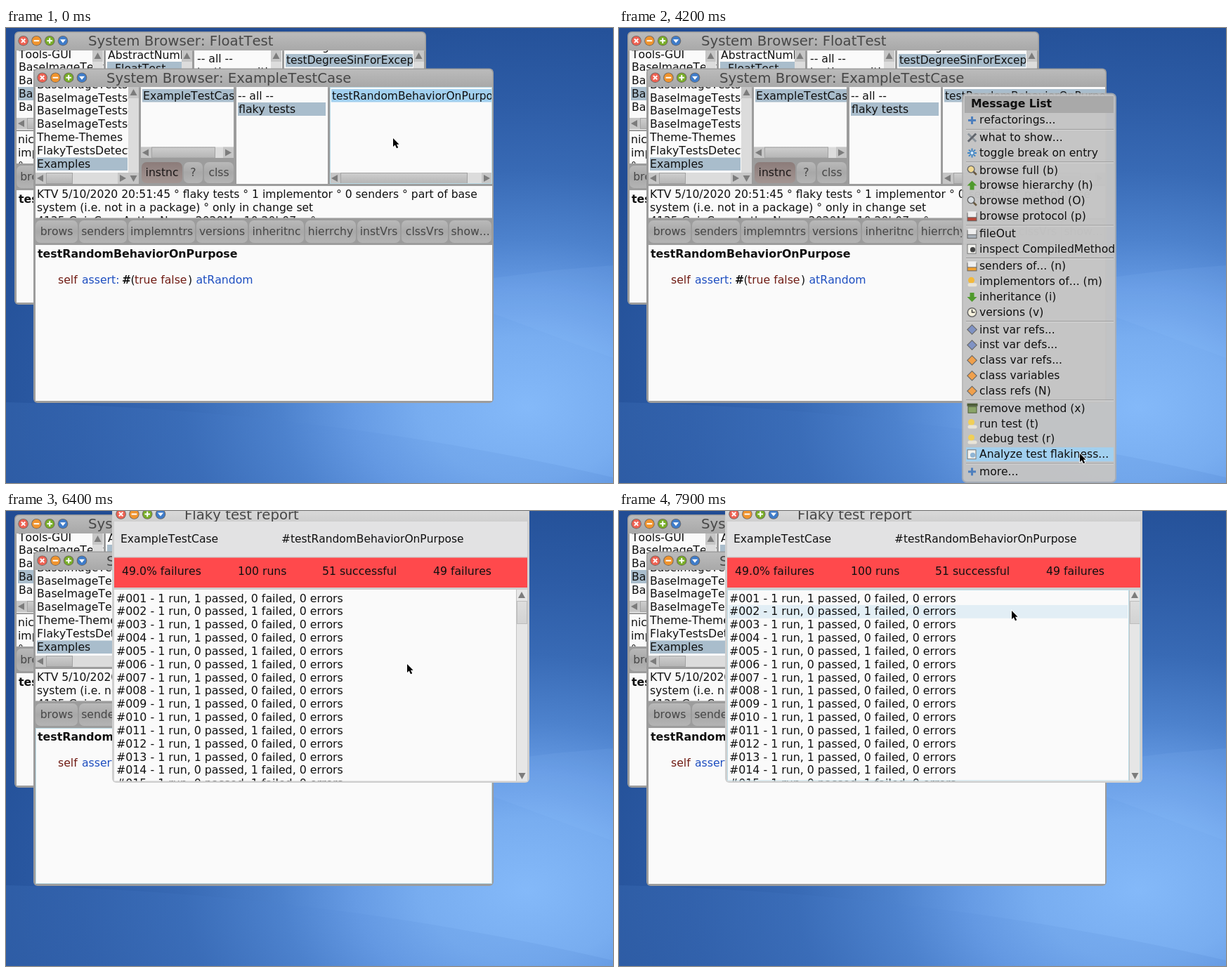
Animation of 864x648 px, one loop 8000 ms. Source, as an HTML page with a canvas:

```html
<!DOCTYPE html>
<html lang="en">
<head>
<meta charset="utf-8">
<title>Flaky test report</title>
<style>
html, body { margin: 0; width: 100%; height: 100%; overflow: hidden; background: #2a5ba8; }
canvas { display: block; }
</style>
</head>
<body>
<canvas id="stage" width="864" height="648"></canvas>
<script>
const c = document.getElementById('stage').getContext('2d');
const SEL = '#a9bdcc', HOVER = '#a2d0ef', FOCUS = '#bcdde8', ROW = 18.83, NAME = { size: 15.45 };

// Pointer path: time, x, y, hovered part (m method list, p code pane, 0.. report row)
const path = [
  [0, 551, 157, 'm'], [100, 505, 260, ''], [200, 459, 363, 'p'], [300, 459, 363, 'p'],
  [400, 457, 362, 'p'], [600, 457, 362, 'p'], [800, 477, 298, ''], [1100, 507, 203, 'm'],
  [1400, 538, 107, 'm'], [1900, 538, 107, 'm'], [2400, 489, 100, 'm'], [2500, 491, 99, 'm'],
  [4100, 491, 99, 'm'], [4200, 656, 606, ''], [4500, 656, 606, ''], [4700, 636, 610, ''],
  [4800, 636, 610, ''], [5000, 646, 607, ''], [5900, 646, 607, ''], [6000, 602, 345, -1],
  [6100, 588, 430, 'p'], [6300, 588, 430, 'p'], [6400, 571, 218, 'p'], [6500, 510, 195, 4],
  [6600, 455, 176, 3], [6700, 455, 176, 3], [6800, 422, 124, 1], [6900, 422, 124, 1],
  [7000, 428, 108, ''], [7200, 450, 78, ''], [7500, 520, 74, ''], [7700, 552, 116, 0],
  [7800, 557, 130, 0], [7900, 559, 142, 1], [8000, 559, 142, 1]
];

function pointer(t) {
  const i = path.findIndex(p => p[0] > t) - 1;
  const a = path[i], b = path[i + 1], k = (t - a[0]) / (b[0] - a[0]);
  return { x: a[1] + (b[1] - a[1]) * k, y: a[2] + (b[2] - a[2]) * k, over: a[3] };
}

function rect(x, y, x2, y2, fill) {
  c.fillStyle = fill;
  c.fillRect(x, y, x2 - x, y2 - y);
}

function frame(x, y, x2, y2, color) {
  c.strokeStyle = color;
  c.lineWidth = 1;
  c.strokeRect(x + .5, y + .5, x2 - x - 1, y2 - y - 1);
}

function round(x, y, x2, y2, r, fill) {
  c.beginPath();
  c.roundRect(x, y, x2 - x, y2 - y, r);
  c.fillStyle = fill;
  c.fill();
}

function poly(points, fill) {
  c.beginPath();
  points.forEach(([x, y]) => c.lineTo(x, y));
  c.closePath();
  c.fillStyle = fill;
  c.fill();
}

function disc(x, y, r, fill) {
  c.beginPath();
  c.arc(x, y, r, 0, 7);
  c.fillStyle = fill;
  c.fill();
}

function shade(y, y2, ...colors) {
  const g = c.createLinearGradient(0, y, 0, y2);
  colors.forEach((col, i) => g.addColorStop(i / (colors.length - 1), col));
  return g;
}

// y is the middle of the line
function text(s, x, y, { size = 15.7, color = '#101010', bold = false, align = 'left' } = {}) {
  c.font = `${bold ? 'bold ' : ''}${size}px "DejaVu Sans", sans-serif`;
  c.textAlign = align;
  c.fillStyle = color;
  c.fillText(s, x, Math.round(y + size * .32));
}

function clip(x, y, x2, y2, draw) {
  c.save();
  c.beginPath();
  c.rect(x, y, x2 - x, y2 - y);
  c.clip();
  draw();
  c.restore();
}

function pane(x, y, x2, y2, draw) {
  rect(x, y, x2, y2, '#fafafa');
  clip(x, y, x2, y2, draw);
}

function arrow(x, y, dir) {
  c.save();
  c.translate(x, y);
  c.rotate(dir * Math.PI / 2);
  poly([[-4, -5], [5, 0], [-4, 5]], '#7c7c7c');
  c.restore();
}

function hbar(x, x2, y, from, to) {
  rect(x, y, x2, y + 16, '#dcdcdc');
  rect(x, y, x + 15, y + 16, '#c6c6c6');
  rect(x2 - 15, y, x2, y + 16, '#c6c6c6');
  rect(from, y, to, y + 16, shade(y, y + 16, '#cfcfcf', '#b4b4b4'));
  frame(from, y, to, y + 16, '#a2a2a2');
  arrow(x + 7, y + 8, 2);
  arrow(x2 - 8, y + 8, 0);
}

function vbar(x, y, y2, down) {
  rect(x, y, x + 15, y2, '#dcdcdc');
  rect(x, y, x + 15, y + 16, '#c6c6c6');
  arrow(x + 7.5, y + 8, 3);
  if (down) {
    rect(x, y2 - 16, x + 15, y2, '#c6c6c6');
    arrow(x + 7.5, y2 - 8, 1);
  }
}

function windowFrame(x, y, x2, y2, title, tx, light) {
  round(x, y, x2, y2, 6, light ? '#cfcfcf' : '#9c9c9c');
  round(x + 1.5, y + 1.5, x2 - 1.5, y + 28, [5, 5, 0, 0],
    light ? shade(y, y + 26, '#dedede', '#cdcdcd') : shade(y, y + 26, '#bcbcbc', '#a9a9a9'));
  ['#ee6253', '#f0942e', '#78ad28', '#3f7cc9'].forEach((col, i) => {
    const cx = x + 12.6 + i * 18.8, cy = y + 13.2;
    disc(cx, cy, 7.3, '#6d6660');
    disc(cx, cy, 6.4, col);
    c.save();
    c.translate(cx, cy);
    if (i == 0) c.rotate(Math.PI / 4);
    if (i < 3) rect(-3.8, -1, 3.8, 1, '#fff');
    if (i == 0 || i == 2) rect(-1, -3.8, 1, 3.8, '#fff');
    if (i == 3) poly([[-4, -2], [4, -2], [0, 3]], '#fff');
    c.restore();
  });
  text(title, tx, y + 14, { size: 19.7, color: '#474747' });
}

function button(x, x2, y, y2, label, on) {
  round(x, y, x2, y2, 7, on ? shade(y, y2, '#8c7c7a', '#a39592') : shade(y, y2, '#b9b9b9', '#a8a8a8', '#b4b4b4'));
  text(label, (x + x2) / 2, (y + y2) / 2, { size: 15.6, color: on ? '#1c1818' : '#464646', align: 'center' });
}

function desktop() {
  // A wide glow low on the right
  const glow = c.createRadialGradient(0, 0, 0, 0, 0, 600);
  [[0, '#84b9f9'], [.17, '#78adf0'], [.28, '#669be4'], [.4, '#4d82cd'], [.56, '#386ab5'],
   [.73, '#2d5ca6'], [.9, '#25529a'], [1, '#214c94']].forEach(s => glow.addColorStop(...s));
  c.save();
  c.translate(740, 540);
  c.scale(1.45, 1);
  rect(-600, -600, 600, 600, glow);
  c.restore();
  poly([[600, 372], [694, 356], [780, 345], [864, 338], [864, 470]], 'rgba(150,200,255,.09)');

  const wave = c.createLinearGradient(0, 0, 864, 0);
  wave.addColorStop(0, 'rgba(120,180,255,.09)');
  wave.addColorStop(.45, 'rgba(70,125,210,.06)');
  wave.addColorStop(1, 'rgba(20,70,160,.08)');
  c.beginPath();
  c.moveTo(0, 533);
  c.bezierCurveTo(280, 540, 560, 570, 864, 640);
  c.lineTo(864, 648);
  c.lineTo(0, 648);
  c.fillStyle = wave;
  c.fill();
}

function backBrowser() {
  windowFrame(12, 5, 598, 394, 'System Browser: FloatTest', 117, false);
  pane(15, 32, 139, 145, () => {
    rect(17, 84, 123, 103, SEL);
    ['Tools-GUI', 'BaseImageTests', 'BaseImageTests', 'BaseImageTests', 'BaseImageTests']
      .forEach((s, i) => text(s, 18, 37.5 + i * ROW));
    vbar(123, 32, 128);
    hbar(15, 139, 128, 30, 70);
  });
  pane(142, 32, 265, 100, () => {
    rect(144, 48, 250, 67, SEL);
    text('AbstractNumberTest', 145, 39);
    text('FloatTest', 155, 57.5);
    vbar(250, 32, 100);
  });
  pane(268, 32, 393, 100, () => {
    text('-- all --', 272, 44);
    text('testing - arithmetic', 272, 63);
    vbar(377, 32, 100);
  });
  pane(396, 32, 595, 100, () => {
    rect(398, 37, 579, 55.5, SEL);
    text('testDegreeSin', 399, 27, NAME);
    clip(396, 32, 579, 100, () => text('testDegreeSinForExceptional', 399, 46, NAME));
    vbar(580, 32, 100);
  });
  pane(15, 147, 595, 193, () =>
    ['nice', 'implementor', '° only'].forEach((s, i) => text(s, 17, 159.3 + i * ROW)));
  button(15, 72, 196, 228, 'brows');
  pane(15, 231, 595, 391, () => text('testDegreeSin', 18, 243.5, { size: 15.8, bold: true }));
}

function frontBrowser(over) {
  windowFrame(39, 57.5, 694, 534, 'System Browser: ExampleTestCase', 143, false);
  pane(42, 84, 189, 222, () => {
    rect(44, 184.5, 173, 203, SEL);
    [...Array(4).fill('BaseImageTests-'), 'Theme-Themes', 'FlakyTestsDetection', 'Examples']
      .forEach((s, i) => text(s, 44, 80.8 + i * ROW));
    vbar(174, 84, 222, true);
    hbar(42, 174, 206, 57, 95);
  });
  pane(192, 84, 324, 185, () => {
    rect(194, 87, 324, 105.5, SEL);
    text('ExampleTestCase', 195, 97);
    hbar(192, 324, 169.5, 207, 298);
  });
  button(193, 251, 191, 221, 'instnc', true);
  button(253, 280, 191, 221, '?');
  button(282, 324, 191, 221, 'clss');
  pane(328, 84, 458, 222, () => {
    rect(330, 106, 455, 125, SEL);
    text('-- all --', 330, 97);
    text('flaky tests', 331, 115.7);
  });
  pane(461, 84, 692, 222, () => {
    rect(463, 87, 692, 105.5, over === 'm' ? HOVER : SEL);
    text('testRandomBehaviorOnPurpose', 464, 97, NAME);
    hbar(461, 692, 206, 476, 657);
    if (over === 'm') frame(461, 84, 692, 222, FOCUS);
  });
  pane(42, 225, 692, 270.5, () =>
    ['KTV 5/10/2020 20:51:45 ° flaky tests ° 1 implementor ° 0 senders ° part of base',
     'system (i.e. not in a package) ° only in change set',
     '4135-GainCore.AuthorName.2020Mar10.20h07m °']
      .forEach((s, i) => text(s, 44, 237.3 + i * ROW, { size: 15.58 })));
  const edges = [41, 103, 173, 270, 345, 425, 499, 562, 630, 692];
  ['brows', 'senders', 'implemntrs', 'versions', 'inheritnc', 'hierrchy', 'instVrs', 'clssVrs', 'show...']
    .forEach((s, i) => button(edges[i] + 1, edges[i + 1] - 1, 274, 306, s));
  pane(42, 309, 692, 531, () => {
    text('testRandomBehaviorOnPurpose', 45, 321.7, { size: 15.8, bold: true });
    const red = '#701c14', blue = '#1d4ec0';
    text('self', 74, 359.3, { color: red });
    text('assert:', 108, 359.3, { color: blue });
    text('#', 165, 359.3, { bold: true });
    text('(', 177.5, 359.3);
    text('true false', 183, 359.3, { color: red });
    text(')', 259, 359.3);
    text('atRandom', 270.5, 359.3, { color: blue });
    if (over === 'p') frame(42, 309, 692, 531, FOCUS);
  });
}

const icons = {
  plus(col) { rect(-5.5, -1.5, 5.5, 1.5, col); rect(-1.5, -5.5, 1.5, 5.5, col); },
  cross(col) { c.rotate(Math.PI / 4); rect(-8, -1.5, 8, 1.5, col); rect(-1.5, -8, 1.5, 8, '#60656c'); },
  star(col) {
    for (let i = 0; i < 4; i++) { rect(-6.5, -1, 6.5, 1, col); c.rotate(Math.PI / 4); }
    disc(0, 0, 2, '#e4f0fa');
  },
  diamond(col) { poly([[0, -7.5], [7.5, 0], [0, 7.5], [-7.5, 0]], '#666'); poly([[0, -6], [6, 0], [0, 6], [-6, 0]], col); },
  up(col) { poly([[0, -7], [7, 0], [3, 0], [3, 6], [-3, 6], [-3, 0], [-7, 0]], col); },
  down(col) { c.rotate(Math.PI); icons.up(col); },
  lens(col) { c.rotate(Math.PI / 4); rect(2, -1.3, 9, 1.3, '#6a5a40'); disc(-2, 0, 5.5, '#666'); disc(-2, 0, 4, col); },
  page(col) { rect(-7, -7, 6, 7, '#777'); rect(-6, -6, 5, 6, '#f2f2ee'); disc(1, 1, 3.6, col); },
  box(col) { rect(-7, -5, 7, 7, '#666'); rect(-6, -7, 6, 1, '#eee'); rect(-6, 2, 6, 6, col); },
  bin(col) { rect(-7, -7, 8, -3, '#4c5c38'); rect(-6, -3, 7, 7, '#4c5c38'); rect(-5, -2, 6, 6, col); },
  clock(col) { disc(0, 0, 7, '#666'); disc(0, 0, 5.5, col); rect(-.7, -4, .7, 0, '#333'); rect(-.7, -.7, 4, .7, '#333'); },
  face(col) { disc(-1, -2, 4.5, col); round(-6, 2, 7, 7, 3, '#e8e4d8'); }
};

// Groups are parted by separator lines
const menuGroups = [
  [['refactorings...', 'plus', '#4e7fbd']],
  [['what to show...', 'cross', '#8c949c'], ['toggle break on entry', 'star', '#3f86c6']],
  [['browse full (b)', 'lens', '#f0d890'], ['browse hierarchy (h)', 'up', '#4f9a2c'],
   ['browse method (O)', 'lens', '#d8dde2'], ['browse protocol (p)', 'box', '#b84838']],
  [['fileOut', 'box', '#a8b0b8'], ['inspect CompiledMethod', 'page', '#444']],
  [['senders of... (n)', 'box', '#f0a030'], ['implementors of... (m)', 'face', '#f2b93c'],
   ['inheritance (i)', 'down', '#4f9a2c'], ['versions (v)', 'clock', '#f4f0dc']],
  [['inst var refs...', 'diamond', '#7f92c4'], ['inst var defs...', 'diamond', '#7f92c4'],
   ['class var refs...', 'diamond', '#f0a04c'], ['class variables', 'diamond', '#f0a04c'],
   ['class refs (N)', 'diamond', '#f0a04c']],
  [['remove method (x)', 'bin', '#8aa468'], ['run test (t)', 'face', '#f0cf58'],
   ['debug test (r)', 'face', '#f0cf58'], ['Analyze test flakiness...', 'page', '#8fb4d4']],
  [['more...', 'plus', '#4e7fbd']]
];

function menu() {
  round(488, 92.5, 708, 648, 7, 'rgba(176,176,176,.85)');
  round(490, 94.5, 706, 646, 5, 'rgba(200,200,200,.8)');
  rect(492, 97, 704, 121, '#a9a9a9');
  text('Message List', 501, 108.3, { bold: true });
  let y = 131.5;
  menuGroups.forEach((group, g) => {
    if (g) {
      rect(494, y - 9.5, 704, y - 8.5, '#929292');
      rect(494, y - 8.5, 704, y - 7.5, '#dadada');
      y += 2.75;
    }
    for (const [label, icon, color] of group) {
      if (label.startsWith('Analyze')) rect(494, y - 10, 704, y + 10, HOVER);
      c.save();
      c.translate(502.5, y);
      icons[icon](color);
      c.restore();
      text(label, 513, y, { size: 15.55 });
      y += 21.87;
    }
  });
}

function report(over) {
  windowFrame(151, -8.7, 745, 387, 'Flaky test report', 254, true);
  rect(154, 15, 742, 65, '#e2e2e3');
  text('ExampleTestCase', 163, 40.3, { size: 15.6 });
  text('#testRandomBehaviorOnPurpose', 392, 40.3, NAME);
  rect(154, 66.5, 742, 109, '#ff494c');
  ['49.0% failures', '100 runs', '51 successful', '49 failures']
    .forEach((s, i) => text(s, [165, 330, 450, 608][i], 86));
  const focused = typeof over === 'number';
  pane(154, 112, 742, 384.5, () => {
    [...'101100111101100'].forEach((p, i) => {
      const y = 124.5 + i * ROW;
      if (over === i) rect(156, y - 9.4, 724, y + 9.4, '#e2eef5');
      text(`#${String(i + 1).padStart(3, '0')} - 1 run, ${p} passed, ${1 - p} failed, 0 errors`, 157, y, { size: 15.8 });
    });
    rect(726, 112, 742, 385, '#e6e6e6');
    rect(726, 112, 727, 385, '#c4c4c4');
    rect(727, 128, 742, 161, shade(128, 161, '#dedede', '#d2d2d2'));
    frame(727, 128, 742, 161, '#bdbdbd');
    arrow(734, 120, 3);
    arrow(734.5, 377, 1);
    if (focused) {
      frame(154, 112, 742, 384.5, FOCUS);
      rect(725, 112, 726, 385, FOCUS);
    }
  });
}

function cursor(x, y) {
  c.save();
  c.translate(x, y);
  const shape = [[0, 0], [0, 12], [2.8, 9.5], [5, 14.2], [7.2, 13.2], [5, 8.8], [8.6, 8.8]];
  poly(shape, '#000');
  c.strokeStyle = '#fff';
  c.lineWidth = 1.6;
  c.stroke();
  poly(shape, '#000');
  c.restore();
}

function draw(now) {
  const t = Math.floor(now % 8000 / 100) * 100;
  const p = pointer(t);
  c.fontKerning = 'none';
  desktop();
  backBrowser();
  frontBrowser(p.over);
  if (t >= 4200 && t < 5400) menu();
  if (t >= 5600) report(p.over);
  cursor(p.x, p.y);
}

const start = performance.now();
function tick() {
  draw(performance.now() - start);
  requestAnimationFrame(tick);
}
tick();
</script>
</body>
</html>
```
